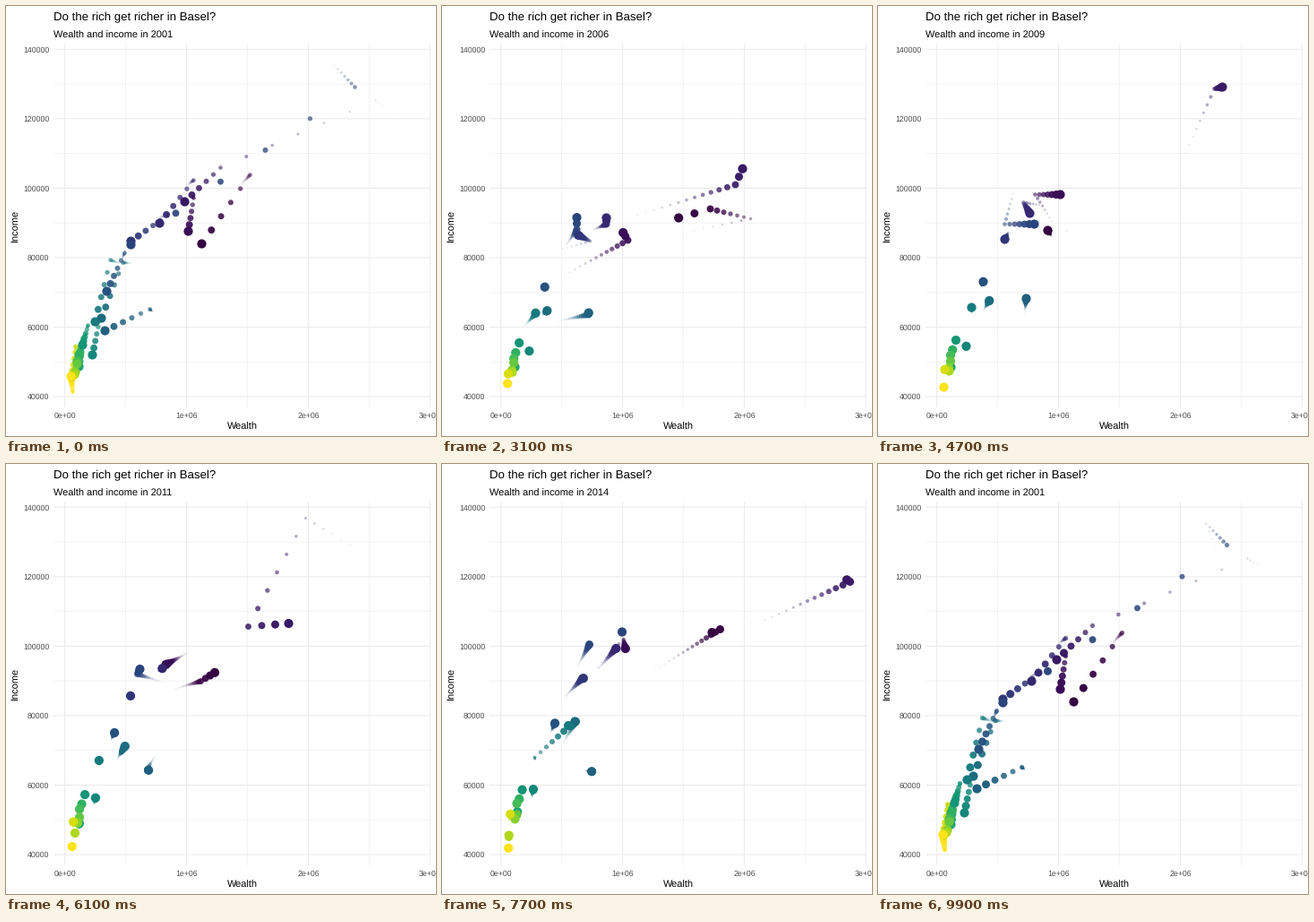
A matplotlib script that plays this animation: 480x480 px, repeating every 10000 ms.

```python
import numpy as np
import matplotlib.pyplot as plt
from matplotlib.animation import FuncAnimation

plt.rcParams["font.family"] = "Liberation Sans"
plt.rcParams["text.hinting"] = "none"

SIZE, DPI, FRAMES = 480, 72, 100
YEARS = 17  # 2001 to 2017, then back to 2001
WAKE = 20

# Every year begins on a whole frame; the last stop closes the loop.
stops = np.arange(YEARS + 1) * FRAMES // YEARS
stops[-1] = FRAMES - 1
phase = np.interp(np.arange(FRAMES), stops, np.arange(YEARS + 1))


def path(*keys):
    """Straight moves between turning points (year, x, y), then home again."""
    year, x, y = np.array([*keys, (YEARS, *keys[0][1:])]).T
    yearly = np.arange(YEARS + 1)
    return np.column_stack([np.interp(phase, yearly, np.interp(yearly, year, v))
                            for v in (x, y)])


def drift(start, end):
    """Slow, accelerating growth over all years, then home again."""
    growth = (np.arange(YEARS) / (YEARS - 1)) ** 2
    gain = np.interp(phase, np.arange(YEARS + 1), [*growth, 0])
    return np.array(start) + np.outer(gain, np.subtract(end, start))


# Richest district first; the restless ones turn often, the poorer ones drift.
tracks = np.array([
    path((0, 218, 265), (3, 281, 250), (4, 344, 237), (5, 299, 226), (6, 193, 256),
         (8, 189, 250), (10, 217, 242), (13, 310, 184), (14, 256, 205), (16, 272, 188)),
    path((0, 203, 251), (2, 205, 266), (3, 136, 300), (5, 207, 261), (7, 175, 210),
         (8, 203, 210), (11, 173, 226), (12, 202, 195), (13, 204, 205), (16, 209, 214)),
    path((0, 199, 218), (3, 218, 233), (5, 327, 199), (7, 375, 92), (8, 384, 90),
         (9, 334, 60), (10, 270, 181), (11, 360, 174), (13, 455, 131), (15, 412, 105),
         (16, 239, 180)),
    path((0, 171, 242), (3, 169, 249), (5, 183, 243), (6, 183, 222), (7, 162, 219),
         (8, 169, 231), (11, 175, 227), (13, 193, 206), (16, 209, 194)),
    path((0, 139, 262), (3, 134, 271), (4, 165, 262), (6, 145, 252), (8, 141, 260),
         (11, 138, 258), (13, 156, 239), (16, 180, 233)),
    path((0, 139, 266), (3, 139, 265), (5, 150, 249), (6, 150, 209), (7, 141, 243),
         (8, 174, 243), (10, 146, 234), (13, 164, 201), (14, 383, 117), (15, 366, 66),
         (16, 389, 90)),
    drift((112, 318), (132, 275)),
    path((0, 110, 362), (3, 130, 351), (5, 163, 344), (8, 165, 326), (10, 157, 341),
         (13, 167, 343), (16, 160, 338)),
    path((0, 106, 348), (5, 116, 341), (10, 129, 320), (13, 149, 287), (16, 130, 286)),
    path((0, 99, 352), (3, 92, 356), (5, 104, 343), (8, 104, 336), (12, 103, 327),
         (13, 142, 292), (16, 116, 283)),
    drift((96, 389), (104, 350)),
    drift((85, 378), (91, 356)),
    path((0, 81, 402), (10, 81, 403), (16, 86, 374)),
    drift((81, 389), (88, 366)),
    drift((79, 396), (85, 370)),
    drift((79, 399), (85, 387)),
    drift((77, 408), (83, 390)),
    path((0, 76, 411), (8, 79, 407), (13, 74, 416), (16, 78, 380)),
    drift((73, 414), (77, 379)),
    path((0, 72, 413), (8, 73, 425), (16, 74, 430)),
]) + 0.5

fig = plt.figure(figsize=(SIZE / DPI, SIZE / DPI), dpi=DPI, facecolor="white")
ax = fig.add_axes([0, 0, 1, 1])
ax.set(xlim=(0, SIZE), ylim=(SIZE, 0))
ax.axis("off")


def x_at(wealth):
    return 65.7 + wealth * 135.85e-6


def y_at(income):
    return 436 - (income - 40000) * 3.877e-3


def grid(wealths, incomes, width):
    style = dict(color="#EBEBEB", lw=width, zorder=1, snap=False)
    ax.vlines([x_at(w) for w in wealths], 42, 448, **style)
    ax.hlines([y_at(i) for i in incomes], 53, 474, **style)


def label(x, y, text, size=11, color="black", **kw):
    return ax.text(x, y, text, fontsize=size, color=color, **kw)


grid(np.arange(0.5e6, 3e6, 1e6), range(50000, 140000, 20000), 0.53)
grid(np.arange(0, 3.1e6, 1e6), range(40000, 140001, 20000), 1.07)

GREY = "#4D4D4D"
for i in range(4):
    label(x_at(i * 1e6), 460, f"{i}e+0{6 if i else 0}", 8.8, GREY, ha="center")
for income in range(40000, 140001, 20000):
    label(48.2, y_at(income) + 3.2, str(income), 8.8, GREY, ha="right")
label(263.5, 473, "Wealth", ha="center")
label(15, 245, "Income", rotation=90, ha="right", va="center")
label(52.8, 16.3, "Do the rich get richer in Basel?", 13.2)
subtitle = label(52.8, 35.5, "")

# Oldest wake points come first, so that the current ones lie on top.
ages = np.arange(WAKE - 1, -1, -1)
fade = np.repeat((1 - ages / WAKE) ** 3, len(tracks))
colors = np.tile(plt.get_cmap("viridis")(np.linspace(0, 1, len(tracks))), (WAKE, 1))
colors[:, :3] **= 1.2
colors[:, 3] = 1 - (1 - fade) ** 2
diameter = 1.65 + 8.55 * fade
dots = ax.scatter(np.zeros(len(fade)), np.zeros(len(fade)), s=diameter ** 2,
                  c=colors, linewidths=0, zorder=3)


def draw(frame):
    points = tracks[:, (frame - ages) % FRAMES]
    dots.set_offsets(points.transpose(1, 0, 2).reshape(-1, 2))
    year = 2001 + int(np.ceil(phase[frame] - 0.5)) % YEARS
    subtitle.set_text(f"Wealth and income in {year}")
    return dots, subtitle


anim = FuncAnimation(fig, draw, frames=FRAMES, interval=100, repeat=True)
plt.show()
```
